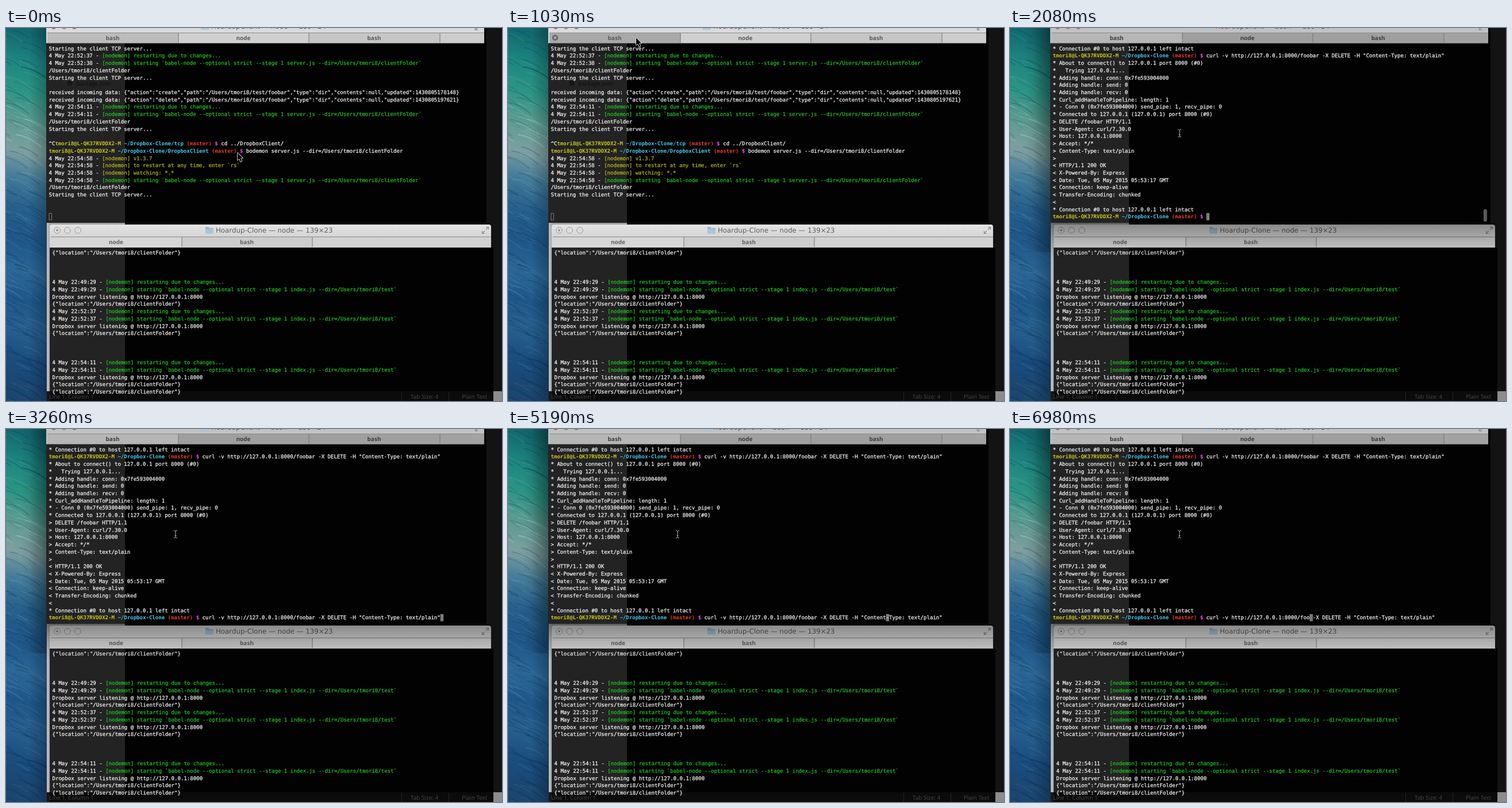
Recreate the animation shown at these times as an HTML page with a canvas. Size 863 by 649 pixels, loop 8000 ms.

```html
<!DOCTYPE html>
<html lang="en">
<head>
<meta charset="utf-8">
<title>Terminal session</title>
<style>
  html, body { margin: 0; width: 100%; height: 100%; overflow: hidden; background: #000; }
  canvas { display: block; }
</style>
</head>
<body>
<canvas id="stage" width="863" height="649"></canvas>
<script>
const ctx = document.getElementById('stage').getContext('2d');
const LOOP = 8000, CELL = 5.45, ROW = 12.72;
const MONO = '9.05px "DejaVu Sans Mono", monospace';
const TITLE = '11.8px "DejaVu Sans", sans-serif';
const TAB = 'bold 10px "Open Sans", sans-serif';
const SMALL = '10px "Open Sans", sans-serif';
const W = '#f6f6f6', G = '#1fc422', Y = '#b6b21c';
const BOLD = { user: '#ccc51e', path: '#40cdee', branch: '#ec3a28', sign: '#f050f0' };

// Terminal text: each line is a list of [colour, text, bold]
const user = 'tmori8', home = '/Users/' + user;
const plain = s => [[W, s]];
const log = (time, color, msg) => [[W, `4 May ${time} - `], [color, '[nodemon] ' + msg]];
const restart = time => log(time, G, 'restarting due to changes...');
const launch = (time, file, dir) =>
  log(time, G, `starting \`babel-node --optional strict --stage 1 ${file} --dir=${home}/${dir}\``);
const prompt = (dir, cmd) => [
  [BOLD.user, user + '@L-QK37RVDDX2-M ', 1], [BOLD.path, `~/Dropbox-Clone${dir} `, 1],
  [BOLD.branch, '(master) ', 1], [BOLD.sign, '$ ', 1], [W, cmd]];
const received = (action, time) => plain(
  `received incoming data: {"action":"${action}","path":"${home}/test/foobar","type":"dir","contents":null,"updated":${time}}`);

const folder = plain(home + '/clientFolder');
const started = plain('Starting the client TCP server...');
const blank = [];
const client = [
  started, restart('22:52:37'), launch('22:52:38', 'server.js', 'clientFolder'), folder, started, blank,
  received('create', 1430805178148), received('delete', 1430805197621),
  restart('22:54:11'), launch('22:54:11', 'server.js', 'clientFolder'), folder, started, blank,
  [[W, '^C'], ...prompt('/tcp', 'cd ../DropboxClient/')],
  prompt('/DropboxClient', `bodemon server.js --dir=${home}/clientFolder`),
  log('22:54:58', Y, 'v1.3.7'), log('22:54:58', Y, 'to restart at any time, enter `rs`'),
  log('22:54:58', Y, 'watching: *.*'), launch('22:54:58', 'server.js', 'clientFolder'), folder, started
];

const command = 'curl -v http://127.0.0.1:8000/foobar -X DELETE -H "Content-Type: text/plain"';
const shell = [
  plain('* Connection #0 to host 127.0.0.1 left intact'),
  prompt('', command),
  ...`* About to connect() to 127.0.0.1 port 8000 (#0)
*   Trying 127.0.0.1...
* Adding handle: conn: 0x7fe593004000
* Adding handle: send: 0
* Adding handle: recv: 0
* Curl_addHandleToPipeline: length: 1
* - Conn 0 (0x7fe593004000) send_pipe: 1, recv_pipe: 0
* Connected to 127.0.0.1 (127.0.0.1) port 8000 (#0)
> DELETE /foobar HTTP/1.1
> User-Agent: curl/7.30.0
> Host: 127.0.0.1:8000
> Accept: */*
> Content-Type: text/plain
>
< HTTP/1.1 200 OK
< X-Powered-By: Express
< Date: Tue, 05 May 2015 05:53:17 GMT
< Connection: keep-alive
< Transfer-Encoding: chunked
<
* Connection #0 to host 127.0.0.1 left intact`.split('\n').map(plain)
];

const place = plain(`{"location":"${home}/clientFolder"}`);
const listening = plain('Dropbox server listening @ http://127.0.0.1:8000');
const run = time => [restart(time), launch(time, 'index.js', 'test'), listening, place];
const server = [place, blank, blank, blank, ...run('22:49:29'), ...run('22:52:37'),
  blank, blank, blank, ...run('22:54:11'), place];

// Drawing helpers
function rect(x, y, w, h, fill) {
  ctx.fillStyle = fill;
  ctx.fillRect(x, y, w, h);
}
function gradient(x0, y0, x1, y1, ...colors) {
  const g = ctx.createLinearGradient(x0, y0, x1, y1);
  colors.forEach((c, i) => g.addColorStop(i / (colors.length - 1), c));
  return g;
}
function label(s, x, y, font, color, align = 'left') {
  ctx.font = font;
  ctx.fillStyle = color;
  ctx.textAlign = align;
  ctx.fillText(s, x, y);
}
function line(color, width, ...p) {
  ctx.strokeStyle = color;
  ctx.lineWidth = width;
  ctx.beginPath();
  for (let i = 0; i < p.length; i += 2) ctx.lineTo(p[i], p[i + 1]);
  ctx.stroke();
}
function disc(x, y, r, fill, stroke) {
  ctx.beginPath();
  ctx.arc(x, y, r, 0, 7);
  ctx.fillStyle = fill;
  ctx.fill();
  if (!stroke) return;
  ctx.strokeStyle = stroke;
  ctx.lineWidth = 1;
  ctx.stroke();
}
function printLine(segments, x, top) {
  let col = 0;
  ctx.textAlign = 'left';
  ctx.lineWidth = .25;
  for (const [color, text, bold] of segments) {
    ctx.font = (bold ? 'bold ' : '') + MONO;
    ctx.fillStyle = ctx.strokeStyle = color;
    for (const ch of text) {
      const left = x + col++ * CELL;
      if (ch === ' ') continue;
      ctx.fillText(ch, left, top + 9.3);
      if (!bold) ctx.strokeText(ch, left, top + 9.3);
    }
  }
}
const print = (lines, x, top) => lines.forEach((l, i) => printLine(l, x, top + i * ROW));

function tabs(edges, names, fills, y, ink) {
  fills.forEach((fill, i) => {
    const x = edges[i], w = edges[i + 1] - x;
    rect(x, y, w, 19, fill);
    if (i) rect(x - .5, y, 1, 19, '#747474');
    if (names[i]) label(names[i], x + w / 2 - .5, y + 13, TAB, ink, 'center');
  });
  rect(edges[0], y, edges.at(-1) - edges[0], 1, '#8a8a8a');
}
function folderIcon(x, y) {
  rect(x, y, 6, 3, '#86aac4');
  rect(x, y + 1.5, 14, 10, '#9dbdd3');
  rect(x, y + 4, 14, 7.5, '#a9c7da');
}
function expandIcon(x, y) {
  line('#888', 1.1, x + 7, y + .5, x + 11.5, y + .5, x + 11.5, y + 5);
  line('#888', 1.1, x + 11, y + 1, x + 7, y + 5);
  line('#888', 1.1, x + .5, y + 7, x + .5, y + 11.5, x + 5, y + 11.5);
  line('#888', 1.1, x + 1, y + 11, x + 5, y + 7);
}

function wallpaper() {
  rect(0, 0, 72, 649, gradient(0, 0, -120, 600,
    '#12686f', '#1d857f', '#2b9584', '#5b9a90', '#7d9fa0', '#3f7898',
    '#255f8c', '#1e5688', '#2a6797', '#1d5688', '#265f8e', '#1a4d7e', '#1a4670'));
  let seed = 7;
  const rnd = () => (seed = seed * 16807 % 2147483647) / 2147483647;
  ctx.lineCap = 'round';
  for (let i = 0; i < 190; i++) {
    const x = rnd() * 70 - 30, y = rnd() * 650, len = 15 + rnd() * 40;
    const foam = Math.exp(-(((y - x * .4 - 185) / 55) ** 2));
    ctx.strokeStyle = rnd() < .5 ? `rgba(190,218,220,${.08 + foam * .25})` : 'rgba(6,42,78,.22)';
    ctx.lineWidth = .7 + rnd() * 1.8;
    ctx.beginPath();
    ctx.moveTo(x, y);
    ctx.quadraticCurveTo(x + len / 2, y + 3, x + len, y + len * .5);
    ctx.stroke();
  }
  ctx.lineCap = 'butt';
}

// The editor lies behind both terminals; its pale sidebar shows in the gaps
function editor() {
  rect(71, 0, 792, 649, '#131313');
  rect(71, 338, 136, 294, gradient(71, 0, 77, 0, '#c4c4c4', '#a2a2a2'));
  rect(71, 632, 792, 17, '#171717');
  rect(848, 632, 15, 17, '#8c8c8c');
}

function serverWindow() {
  rect(76, 382, 772, 267, '#020202');
  rect(76, 382, 131, 250, '#232323');
  rect(76, 632, 772, 17, '#0b0b0b');
  label('Line 1, Column 1', 75, 644.5, SMALL, '#454545');
  label('Tab Size: 4', 704, 644.5, SMALL, '#484848');
  label('Plain Text', 793, 644.5, SMALL, '#484848');
  for (const x of [688, 770]) rect(x, 633, 1, 16, '#242424');

  ctx.beginPath();
  ctx.roundRect(76, 342, 768, 40, [4, 4, 0, 0]);
  ctx.fillStyle = gradient(0, 342, 0, 364, '#e4e4e4', '#d4d4d4');
  ctx.fill();
  tabs([78, 306, 533, 844], ['node', 'bash'], ['#d6d6d6', '#cccccc', '#d2d2d2'], 363, '#606060');
  rect(76, 381, 768, 1, '#d8d8d8');
  for (const x of [89, 107, 125]) disc(x, 352, 5.3, '#dedede', '#9a9a9a');
  disc(89, 352, 1.8, '#888');
  folderIcon(347, 346.5);
  label('Hoardup-Clone — node — 139×23', 365, 356.3, TITLE, '#5e5e5e');
  expandIcon(828, 346);
  print(server, 80.5, 385);
}

function clientWindow(active, hover) {
  rect(70, 27, 766, 312, '#020202');
  rect(70, 27, 137, 312, '#232323');
  label('node_modules', 122, 46, SMALL, '#151515');
  rect(107, 92, 8, 8, '#161616');
  label('package.json', 122, 99.5, SMALL, '#0d0d0d');

  rect(70, 0, 762, 27, active ? '#c2c2c2' : '#dadada');
  rect(832, 0, 4, 27, '#050505');
  const first = active ? '#b6b6b6' : hover ? '#a9a9a9' : '#bcbcbc';
  const rest = active ? ['#9f9f9f', '#9f9f9f', '#a2a2a2'] : ['#d0d0d0', '#c6c6c6', '#cdcdcd'];
  tabs([72, 300, 527, 755, 832], ['bash', 'node', 'bash'], [first, ...rest], 8, active ? '#3c3c3c' : '#5a5a5a');
  rect(70, 26, 762, 1, '#666');
  ['#c8625a', '#cfae50', '#6ea85e'].forEach((c, i) => disc(83 + i * 18, -3.5, 5, c, '#777'));
  folderIcon(339, -9);
  label(`HoardupClient — ${active ? 'bash' : 'node'} — 139×24`, 357, 1.3, TITLE, '#505050');
  expandIcon(816, -8);
  if (hover) {
    disc(82, 17, 5, '#606060');
    line('#ccc', 1.3, 80, 15, 84, 19);
    line('#ccc', 1.3, 84, 15, 80, 19);
  }
}

// Shadow of the focused window over everything behind it
function focusShadow() {
  rect(70, 339, 774, 63, gradient(0, 339, 0, 402, 'rgba(0,0,0,.42)', 'rgba(0,0,0,.16)', 'rgba(0,0,0,0)'));
  rect(26, 0, 44, 390, gradient(26, 0, 70, 0, 'rgba(0,0,0,0)', 'rgba(0,0,0,.22)'));
}

// Pointer stops: [time, x, y]
const stops = [[0, 403, 217], [140, 386, 196], [290, 343, 148], [440, 287, 90], [590, 246, 53],
  [890, 227, 23], [1030, 223, 17], [1630, 229, 34], [1780, 252, 82], [1930, 281, 146], [2080, 295, 183]];

function pointer(t) {
  const [time, x, y] = stops.findLast(s => s[0] <= t);
  if (time >= 1630) {
    line('#b4b4b4', 1, x - 3, y - 7, x - .5, y - 5.5, x + .5, y - 5.5, x + 3, y - 7);
    line('#b4b4b4', 1, x - 3, y + 7, x - .5, y + 5.5, x + .5, y + 5.5, x + 3, y + 7);
    line('#b4b4b4', 1, x, y - 6, x, y + 6);
    line('#b4b4b4', 1, x - 1.5, y + 2.5, x + 1.5, y + 2.5);
    return;
  }
  const p = [0, 0, 0, 13, 3, 10.4, 5.3, 15.6, 7.4, 14.6, 5.2, 9.6, 9, 9.4];
  ctx.beginPath();
  for (let i = 0; i < p.length; i += 2) ctx.lineTo(x + p[i], y + p[i + 1]);
  ctx.closePath();
  ctx.lineWidth = 1.6;
  ctx.strokeStyle = '#eee';
  ctx.stroke();
  ctx.fillStyle = '#000';
  ctx.fill();
}

const erased = t => [6680, 6830, 6980].filter(s => t >= s).length;

function cursorColumn(t) {
  if (t < 3260) return 49;
  if (t < 4460) return 125;
  if (t < 4760) return 124;
  if (t < 5930) {
    const n = Math.min(8, Math.floor((t - 4760) / 143) + 1);
    return Math.round(124 - n * 4.375);
  }
  return t < 6380 ? 86 : 85 - erased(t);
}

function draw(t) {
  const active = t >= 1480, x = 74.5, top = 29.4, last = top + 23 * ROW;
  ctx.textRendering = 'geometricPrecision';
  ctx.lineJoin = 'round';
  wallpaper();
  editor();
  rect(40, 0, 31, 649, gradient(40, 0, 71, 0, 'rgba(0,0,0,0)', 'rgba(0,0,0,.25)'));
  serverWindow();
  if (active) focusShadow();
  clientWindow(active, t >= 890 && t < 1630);

  if (active) {
    print(shell, x, top);
    rect(x + cursorColumn(t) * CELL, 322, 5.5, 12.5, '#7c7c7c');
    const typed = t < 3260 ? '' : command.slice(0, 36 - erased(t)) + command.slice(36);
    printLine(prompt('', typed), x, last);
    if (t >= 1630 && t < 2970) {
      ctx.beginPath();
      ctx.roundRect(824, 315, 6, 22, 3);
      ctx.fillStyle = t < 2820 ? '#5a5a5a' : '#2c2c2c';
      ctx.fill();
    }
  } else {
    print(client, x, top);
    ctx.strokeStyle = '#7c7c7c';
    ctx.lineWidth = 1;
    ctx.strokeRect(75, 322.5, 4.5, 11.5);
  }
  pointer(t);
}

const begin = performance.now();
function tick() {
  draw((performance.now() - begin) % LOOP);
  requestAnimationFrame(tick);
}
tick();
</script>
</body>
</html>
```
